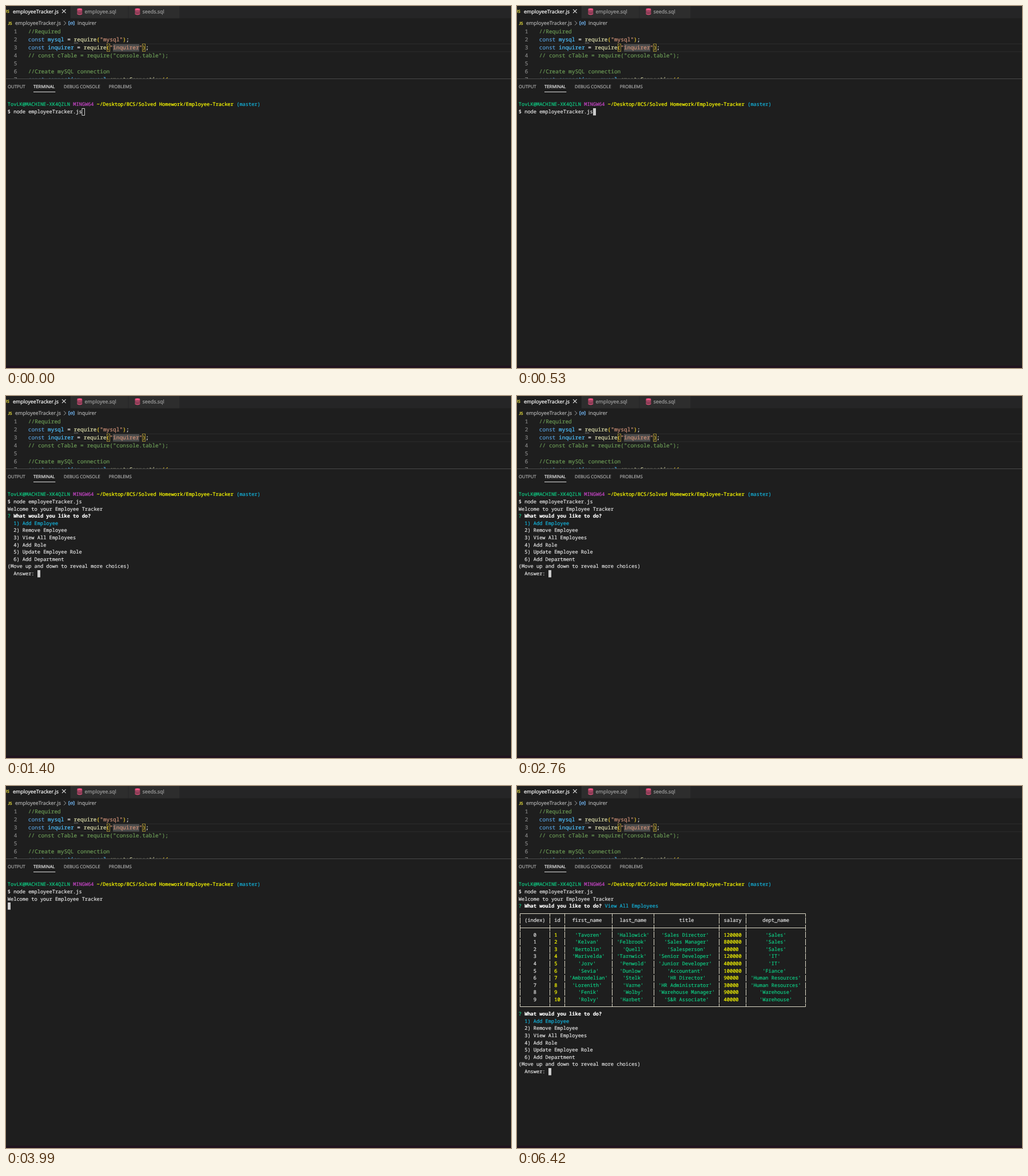
Write an HTML page that moves like this. It is 883 by 634 pixels and loops after 8 s.

```html
<!DOCTYPE html>
<html lang="en">
<head>
<meta charset="utf-8">
<title>Employee Tracker</title>
<style>
  html, body { margin: 0; width: 100%; height: 100%; overflow: hidden; background: #1e1e1e; }
  svg { display: block; }
  text { text-rendering: geometricPrecision; white-space: pre; stroke-width: .22px; }
  .ui { font: 8.95px "Open Sans", "Noto Sans", sans-serif; }
  .panel { font: 7.78px "Open Sans", "Noto Sans", sans-serif; }
  .badge { font: bold 7.2px Lato, sans-serif; }
  .code { font: 9.5px "Noto Sans Mono", monospace; }
  .term { font: 8.667px "Noto Sans Mono", monospace; }
  .bold { font-weight: bold; }
</style>
</head>
<body>
<svg id="stage" width="883" height="634" viewBox="0 0 883 634">
  <defs>
    <clipPath id="editorClip"><rect y="38" width="883" height="89"/></clipPath>
    <g id="database" fill="#f55385">
      <ellipse cx="5" cy="2" rx="4.5" ry="1.8"/>
      <path id="disc" d="M.5 3.4Q5 6.4 9.5 3.4V4.8Q5 7.8 .5 4.8Z"/>
      <use href="#disc" y="2.6"/>
      <use href="#disc" y="5.2"/>
    </g>
  </defs>
  <g id="chrome"></g>
  <g id="editor" clip-path="url(#editorClip)"></g>
  <g id="panel"></g>
  <g id="terminal"></g>
</svg>
<script>
const LOOP = 8000;
const GREEN = '#0fc982', CYAN = '#14b2da', YELLOW = '#ffff00', MAGENTA = '#c445c4';
const PLAIN = '#e2e2e2', WHITE = '#ffffff', RULE = '#dedac8';
const byId = id => document.getElementById(id);

function add(parent, tag, attrs, content = '') {
  const node = document.createElementNS('http://www.w3.org/2000/svg', tag);
  for (const key in attrs) node.setAttribute(key, attrs[key]);
  node.textContent = content;
  parent.append(node);
  return node;
}
const rect = (parent, x, y, width, height, fill) =>
  add(parent, 'rect', { x, y, width, height, fill });
const stroke = (parent, d, color, width = 1) =>
  add(parent, 'path', { d, fill: 'none', stroke: color, 'stroke-width': width });
const label = (parent, x, y, content, color, style) =>
  add(parent, 'text', { x, y, fill: color, stroke: color, class: style }, content);

// Tabs and breadcrumbs
function drawChrome(g) {
  rect(g, 0, 0, 883, 21.5, '#252526');
  rect(g, 0, 0, 112.5, 21.5, '#1e1e1e');
  rect(g, 113, 0, 100.5, 21.5, '#2d2d2d');
  rect(g, 214.3, 0, 89, 21.5, '#2d2d2d');
  label(g, -1.4, 12, 'JS', '#d8d03c', 'badge');
  label(g, 12, 12.5, 'employeeTracker.js', '#ffffff', 'ui');
  stroke(g, 'M98 5.8l6.6 6.6m0-6.6l-6.6 6.6', '#e4e4e4', 1.1);
  add(g, 'use', { href: '#database', x: 123.8, y: 3.9 });
  label(g, 137.6, 12.5, 'employee.sql', '#a0a0a0', 'ui');
  add(g, 'use', { href: '#database', x: 224.9, y: 3.9 });
  label(g, 238.4, 12.5, 'seeds.sql', '#a0a0a0', 'ui');

  label(g, 3.4, 32.8, 'JS', '#d8d03c', 'badge');
  label(g, 16, 33.2, 'employeeTracker.js', '#b0b0b0', 'ui');
  stroke(g, 'M101.2 26.4l3.5 3.6l-3.5 3.6', '#a9a9a9');
  stroke(g, 'M111.8 27h-2v6.2h2m5.4-6.2h2v6.2h-2', '#75beff');
  stroke(g, 'M112.2 29.4l2.6-1.3l2.2 1v2l-2.6 1.4l-2.2-1zl2.3 1l2.5-1.3', '#75beff', 0.9);
  label(g, 125, 33.2, 'inquirer', '#b0b0b0', 'ui');
}

function drawEditor(g) {
  const LEFT = 38.8, CELL = 5.7;
  const [KEY, NAME, CALL, STRING, NOTE, GOLD] =
    ['#569cd6', '#4fc1ff', '#dcdcaa', '#ce9178', '#6a9955', '#f0cc30'];
  const lines = [
    [['//Required', NOTE]],
    [['const ', KEY], ['mysql', NAME], [' = ', PLAIN], ['require', CALL], ['(', GOLD],
     ['"mysql"', STRING], [')', GOLD], [';', PLAIN]],
    [['const ', KEY], ['inquirer', NAME], [' = ', PLAIN], ['require', CALL], ['(', GOLD],
     ['"inquirer"', STRING], [')', GOLD], [';', PLAIN]],
    [['// const cTable = require("console.table");', NOTE]],
    [],
    [['//Create mySQL connection', NOTE]],
    [['const ', KEY], ['connection', NAME], [' = ', PLAIN], ['mysql', NAME], ['.', PLAIN],
     ['createConnection', CALL], ['({', GOLD]],
  ];
  rect(g, LEFT, 65.7, 846, 1.3, '#2a2a2a');
  rect(g, LEFT, 79.3, 846, 1.3, '#2a2a2a');
  rect(g, 187, 66.8, 46, 13, '#4b4b4b');
  for (const x of [176.5, 238.5])
    add(g, 'rect', { x, y: 66.5, width: 5, height: 13, fill: 'none', stroke: '#a08c34' });
  lines.forEach((parts, i) => {
    const y = 48.1 + 14.03 * i;
    label(g, 13.7, y, String(i + 1), '#858585', 'code');
    let col = 0;
    for (const [word, color] of parts) {
      label(g, LEFT + col * CELL, y, word, color, 'code');
      col += word.length;
    }
  });
  for (let i = 0; i < 3; i++) rect(g, 119.3 + i * 2.6, 64, 1.2, 1.2, '#bdbdbd');
}

function drawPanel(g) {
  rect(g, 0, 127, 883, 1, '#4a4a4a');
  label(g, 3, 143.9, 'OUTPUT', '#aaaaaa', 'panel');
  label(g, 48, 143.9, 'TERMINAL', '#f0f0f0', 'panel');
  label(g, 101, 143.9, 'DEBUG CONSOLE', '#aaaaaa', 'panel');
  label(g, 179.7, 143.9, 'PROBLEMS', '#aaaaaa', 'panel');
  rect(g, 48, 150, 38.3, 1, '#e0e0e0');
  rect(g, 0, 630, 883, 4, '#20141f');
}

// Terminal grid
const colX = col => 2.8 + col * 5.2;
const rowY = row => 166.6 + row * 12.6;
const put = (g, col, row, content, color = PLAIN, style = '') =>
  label(g, colX(col), rowY(row) + 8.8, content, color, 'term ' + style);

function cursor(g, col, row, hollow) {
  const x = Math.round(colX(col)), y = Math.round(rowY(row));
  if (hollow) stroke(g, `M${x - .1} ${y + .5}h4.6v12h-4.6z`, '#cccccc');
  else rect(g, x, y, 5, 12.6, '#cccccc');
}

function command(g) {
  put(g, 0, 0, 'TovLK@MACHINE-XK4QZLN', GREEN);
  put(g, 22, 0, 'MINGW64', MAGENTA);
  put(g, 30, 0, '~/Desktop/BCS/Solved Homework/Employee-Tracker', YELLOW);
  put(g, 77, 0, '(master)', CYAN);
  put(g, 0, 1, '$ node employeeTracker.js');
}

function welcome(g) {
  command(g);
  put(g, 0, 2, 'Welcome to your Employee Tracker');
}

function question(g, row) {
  put(g, 0, row, '?', GREEN);
  put(g, 2, row, 'What would you like to do?', WHITE, 'bold');
}

function menu(g, row, selected, answer) {
  const choices = ['Add Employee', 'Remove Employee', 'View All Employees',
    'Add Role', 'Update Employee Role', 'Add Department'];
  question(g, row);
  choices.forEach((choice, i) =>
    put(g, 2, row + 1 + i, `${i + 1}) ${choice}`, i + 1 === selected ? CYAN : PLAIN));
  put(g, 0, row + 7, '(Move up and down to reveal more choices)');
  put(g, 2, row + 8, 'Answer: ' + answer);
  cursor(g, 10 + answer.length, row + 8);
}

function table(g, top) {
  const heads = ['(index)', 'id', 'first_name', 'last_name', 'title', 'salary', 'dept_name'];
  const widths = [9, 4, 15, 13, 21, 8, 19];
  const people = [
    ['Tavoren', 'Hallowick', 'Sales Director', 120000, 'Sales'],
    ['Kelvan', 'Felbrook', 'Sales Manager', 800000, 'Sales'],
    ['Bertolin', 'Quell', 'Salesperson', 40000, 'Sales'],
    ['Marivelda', 'Tarnwick', 'Senior Developer', 120000, 'IT'],
    ['Jorv', 'Penwold', 'Junior Developer', 400000, 'IT'],
    ['Sevia', 'Dunlow', 'Accountant', 100000, 'Fiance'],
    ['Ambrodelian', 'Stelk', 'HR Director', 90000, 'Human Resources'],
    ['Lorenith', 'Varne', 'HR Administrator', 30000, 'Human Resources'],
    ['Fenik', 'Wolby', 'Warehouse Manager', 90000, 'Warehouse'],
    ['Rolvy', 'Harbet', 'S&R Associate', 40000, 'Warehouse'],
  ];
  const bottom = top + people.length + 3;
  const snap = value => Math.floor(value) + 0.5;
  const barX = bar => snap(colX(bar) + 2.5);
  const middle = row => snap(rowY(row) + 6.1);
  const bars = [0];
  widths.forEach((w, i) => bars.push(bars[i] + w + 1));

  const fill = (cells, row, colorOf) => cells.forEach((cell, i) => {
    const pad = Math.floor((widths[i] - cell.length) / 2);
    put(g, bars[i] + 1 + pad, row, cell, colorOf(cell, i));
  });
  fill(heads, top + 1, () => PLAIN);
  people.forEach((person, i) => {
    const cells = [i, i + 1, ...person].map((value, c) =>
      c > 1 && typeof value === 'string' ? `'${value}'` : String(value));
    fill(cells, top + 3 + i, (cell, c) => c === 0 ? PLAIN : cell[0] === "'" ? GREEN : YELLOW);
  });

  let d = '';
  for (const row of [top, top + 2, bottom])
    d += `M${barX(0)} ${middle(row)}H${barX(bars.at(-1))}`;
  for (const bar of bars)
    for (let row = top; row <= bottom; row++) {
      const from = row === top ? 0 : -5.5, to = row === bottom ? 0 : 5.5;
      d += `M${barX(bar)} ${middle(row) + from}v${to - from}`;
    }
  stroke(g, d, RULE);
}

const steps = [
  [0, g => { command(g); cursor(g, 25, 1, true); }],
  [530, g => { command(g); cursor(g, 25, 1); }],
  [1000, g => { command(g); cursor(g, 0, 2); }],
  [1400, g => { welcome(g); menu(g, 3, 1, ''); }],
  [3670, g => { welcome(g); menu(g, 3, 3, '3'); }],
  [3990, g => { welcome(g); cursor(g, 0, 3); }],
  [4060, g => {
    welcome(g);
    question(g, 3);
    put(g, 29, 3, 'View All Employees', CYAN);
    table(g, 4);
    menu(g, 18, 1, '');
  }],
];

drawChrome(byId('chrome'));
drawEditor(byId('editor'));
drawPanel(byId('panel'));
const screens = steps.map(([, draw]) => {
  const g = add(byId('terminal'), 'g', { display: 'none' });
  draw(g);
  return g;
});

const start = performance.now();
let shown = -1;
function tick() {
  const time = (performance.now() - start) % LOOP;
  const current = steps.filter(([at]) => at <= time).length - 1;
  if (current !== shown) {
    screens.forEach((g, i) => g.setAttribute('display', i === current ? 'inline' : 'none'));
    shown = current;
  }
  requestAnimationFrame(tick);
}
tick();
</script>
</body>
</html>
```
